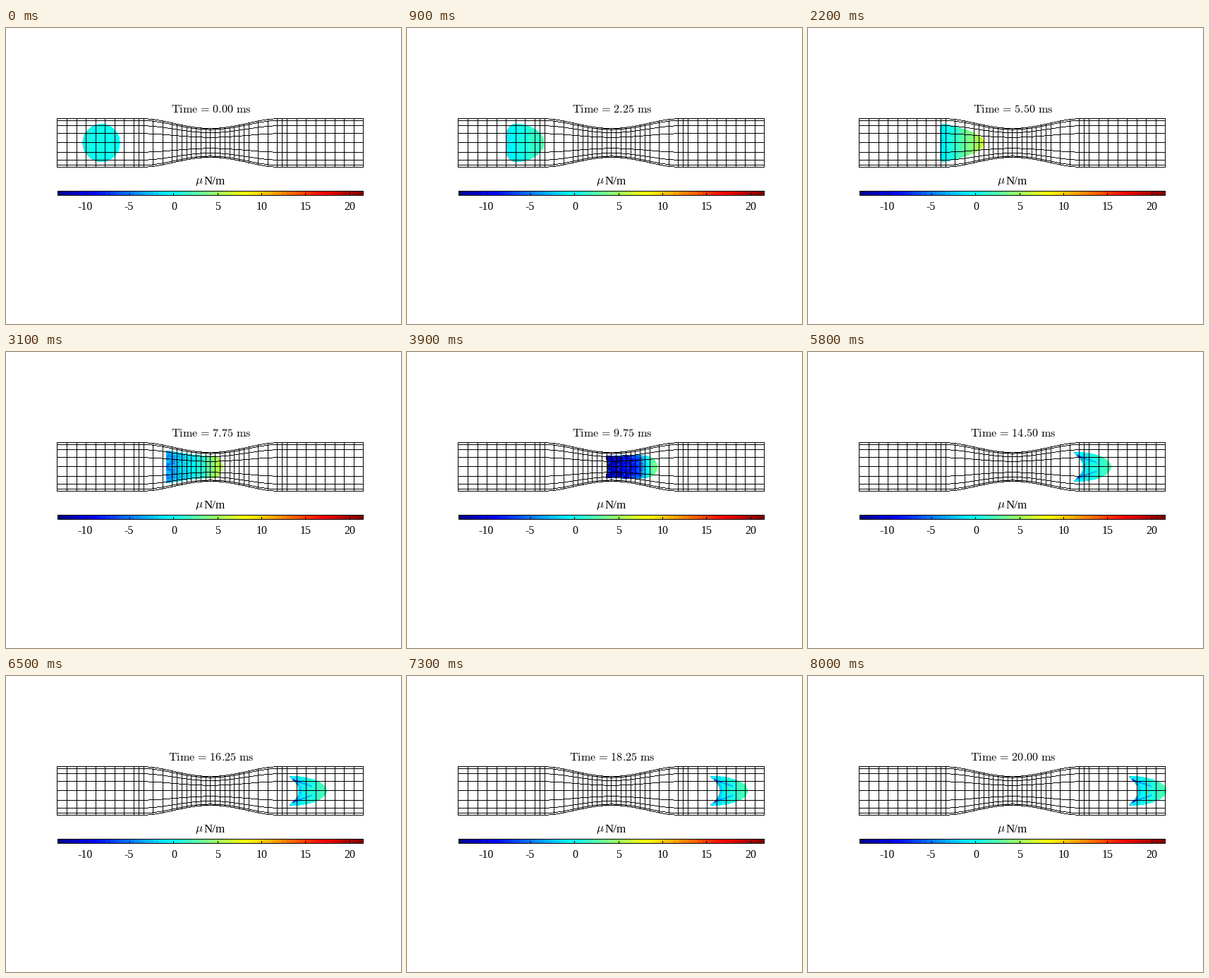
Recreate the animation shown at these times as a matplotlib script. Size 560 by 420 pixels, loop 8100 ms.

```python
import numpy as np
import matplotlib.pyplot as plt
from matplotlib.animation import FuncAnimation

plt.rcParams["mathtext.fontset"] = "cm"

W, H, DPI = 560, 420, 100
FRAMES, STEP = 81, 100
LEFT, RIGHT, MID_X, MID_Y = 72.45, 506.45, 289.45, 162.5
CELL = (RIGHT - LEFT) / 32
V_MIN, V_MAX = -13.2, 21.55
BAR_LEFT, BAR_RIGHT, BAR_TOP, BAR_BOTTOM = 73, 506, 231, 237

GX, GY = np.meshgrid(np.arange(W), np.arange(H))
OFFSET = np.abs(GY - MID_Y)

rng = np.random.default_rng(4)
NOISE = rng.normal(size=(16, 44))
NOISE = np.clip((NOISE + np.roll(NOISE, 1, axis=1)) / 1.4, -1.8, 1.8)


def px(size):
    return size * 72 / DPI


def row(y):
    return np.ceil(np.asarray(y) - 0.5).astype(int)


def sigmoid(x):
    return 1 / (1 + np.exp(-x))


def bump(x):
    return np.exp(-x * x)


def jet(value):
    """Colour of a tension value, in 64 steps."""
    level = np.clip((value - V_MIN) / (V_MAX - V_MIN), 0, 1)
    level = np.ceil(level * 64) / 64
    return np.stack([np.clip(1.5 - np.abs(4 * level - c), 0, 1) for c in (3, 2, 1)], axis=-1)


def wall(x):
    """Half height of the channel."""
    phase = np.clip((x - MID_X) / (7 * CELL), -1, 1)
    return 34.5 - 14 * (0.5 + 0.5 * np.cos(np.pi * phase)) ** 0.85


def paint_mesh(image):
    fine = [8.5, *np.arange(12.5, 20), 23.5]
    nodes = LEFT + CELL * np.array(sorted([*range(33), *fine]))
    for x in nodes:
        h = wall(x)
        image[row(MID_Y - h):row(MID_Y + h) + 1, row(x)] = 0
    columns = np.arange(row(LEFT), row(RIGHT) + 1)
    half = np.interp(columns, nodes, wall(nodes))
    for k in range(9):
        image[row(MID_Y - half * np.cos(k * np.pi / 8)), columns] = 0


def bar_x(value):
    return BAR_LEFT + (BAR_RIGHT - BAR_LEFT) * (value - V_MIN) / (V_MAX - V_MIN)


def paint_colorbar(image):
    columns = np.linspace(V_MIN, V_MAX, BAR_RIGHT - BAR_LEFT + 1)
    image[BAR_TOP:BAR_BOTTOM + 1, BAR_LEFT:BAR_RIGHT + 1] = jet(columns)
    image[[BAR_TOP, BAR_BOTTOM], BAR_LEFT:BAR_RIGHT + 1] = 0
    image[BAR_TOP:BAR_BOTTOM + 1, [BAR_LEFT, BAR_RIGHT]] = 0
    for value in range(-10, 21, 5):
        image[BAR_BOTTOM - 3:BAR_BOTTOM, row(bar_x(value))] = 0


def paint_drop(image, t):
    """Paint the drop at t seconds."""
    # Both ends drift steadily and gain extra distance while in the throat
    rear = 107.8 + 35.2 * t + 65 * sigmoid((t - 3.81) / 0.4)
    nose = 161 + 35.5 * t + 62.5 * sigmoid((t - 2.97) / 0.47)
    length = nose - rear
    squeeze = bump((t - 3.9) / 0.7)
    crown = sigmoid((t - 4.4) / 0.25)

    # Outline: rounded rear up to the widest place, then a tapering nose
    s = (GX - rear) / length
    sc = np.clip(s, 0, 1)
    radius = 27 - 5.7 * sigmoid((t - 3.3) / 0.3) - 5 * squeeze
    widest = 0.5 * np.exp(-t / 1.5)
    taper = 2 - bump((t - 2.2) / 0.7) + 6 * bump((t - 3.9) / 0.85)
    rounding = bump(t / 1.6)
    power = 2 + 2 * (1 - rounding)
    front = np.clip((sc - widest) / (1 - widest), 0, 1) ** taper
    back = rounding * np.clip((widest - sc) / widest, 0, 1) ** power
    half = radius * np.sqrt(np.clip(1 - front - back, 1e-4, 1))
    half = np.minimum(half, 0.78 * wall(GX))
    notch = 12.5 * crown / length * np.clip(1 - (OFFSET / (radius - 2)) ** 2, 0, 1)
    inside = (s >= notch) & (s <= 1) & (OFFSET <= half)

    # Tension: rises towards the nose, drops while squeezed, streaks behind
    eta = np.clip(OFFSET / half, 0, 1)
    depth = sc - notch
    onset = 1 - np.exp(-t / 0.8)
    value = (2.3 * onset + 5 * bump((t - 2.5) / 1.3) * onset) * sc - 1.5 * onset * (1 - sc)
    value -= 10 * squeeze * sigmoid((0.75 - sc) / 0.06) * (1 - 0.4 * eta ** 6)
    noise = NOISE[(eta * 15).astype(int), (sc * 43).astype(int)]
    value += (0.4 * onset + 2.2 * squeeze + 0.6 * crown) * noise * (1.1 - sc)
    streaks = (bump((eta - 0.72 + 0.9 * depth) / 0.08) * (depth < 0.4)
               + 0.6 * bump((depth - 0.05) / 0.035) * (eta < 0.8))
    value -= 4 * crown * streaks
    image[inside] = jet(value[inside])


background = np.ones((H, W, 3))
paint_colorbar(background)


def picture(t):
    image = background.copy()
    paint_drop(image, t)
    paint_mesh(image)
    return image


fig = plt.figure(figsize=(W / DPI, H / DPI), dpi=DPI, facecolor="white")
ax = fig.add_axes([0, 0, 1, 1])
ax.axis("off")
stage = ax.imshow(picture(0), extent=(0, W, H, 0), aspect="auto", interpolation="nearest")
title = ax.text(290.5, 119.5, "", ha="center", va="baseline", fontsize=px(16.2))

for tick in range(-10, 21, 5):
    ax.text(bar_x(tick) + (-1 if tick < 0 else 0.5), 258.5, str(tick), ha="center",
            va="baseline", family="Liberation Serif", fontsize=px(16))
ax.text(267.5, 221.5, r"$\mu$", fontsize=px(17), va="baseline")
ax.text(310.5, 221.5, "N/m", ha="right", va="baseline",
        family="Liberation Serif", fontsize=px(17))


def update(frame):
    stage.set_data(picture(frame * STEP / 1000))
    title.set_text(r"$\mathrm{Time\hspace{0.133}=\hspace{0.133}%.2f\ ms}$" % (frame * 0.25))
    return stage, title


animation = FuncAnimation(fig, update, frames=FRAMES, interval=STEP,
                          repeat=True, repeat_delay=0)
plt.show()
```
